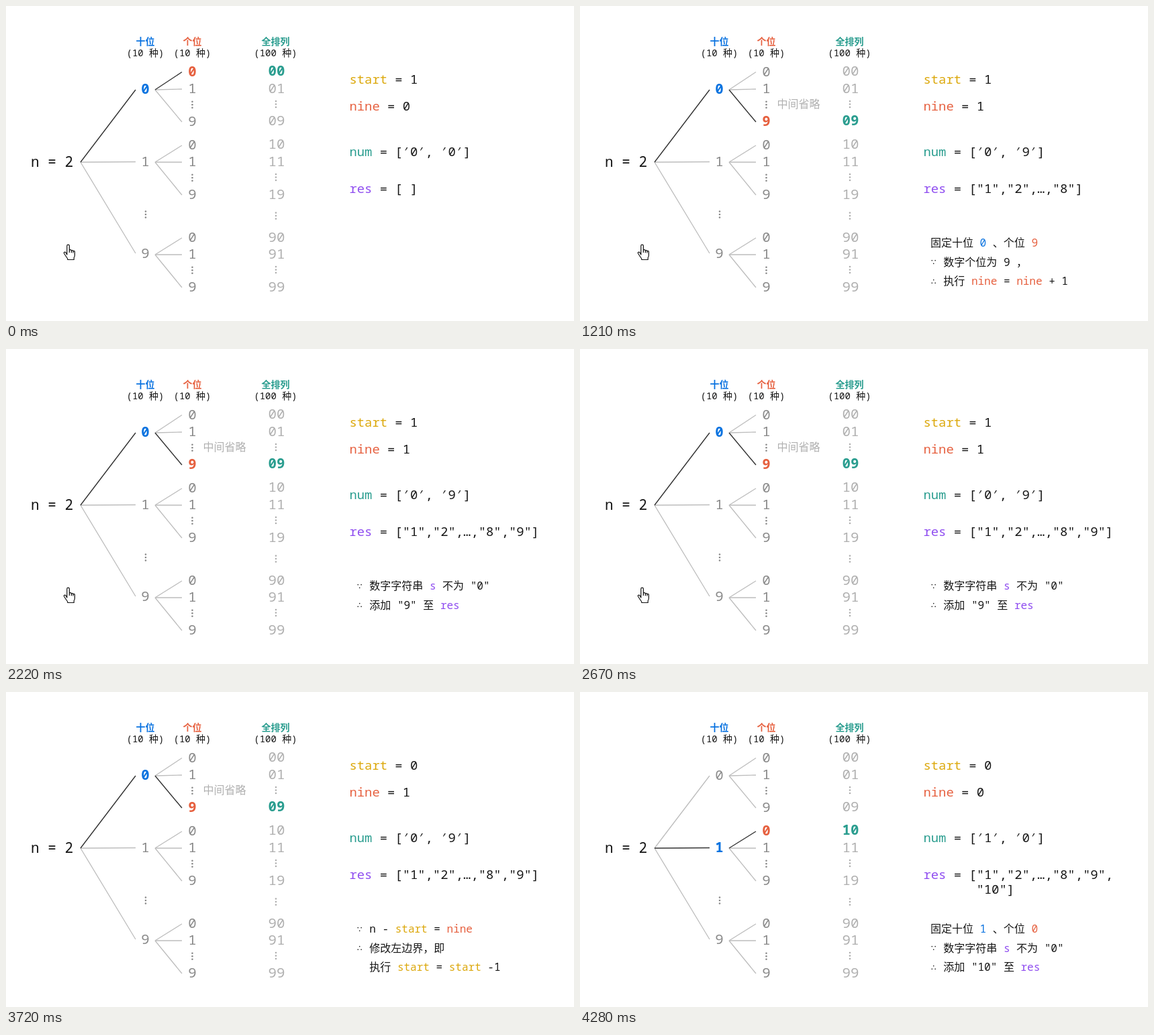
An HTML page for the animation above (5010 ms loop, 846 by 470 pixels).

```html
<!DOCTYPE html>
<html lang="zh-CN">
<head>
<meta charset="utf-8">
<title>递归全排列</title>
<style>
  html, body { margin: 0; width: 100%; height: 100%; overflow: hidden; background: #fff; }
  svg { display: block; width: 846px; height: 470px; }
  text {
    font-family: 'Noto Sans Mono', 'DejaVu Sans Mono', 'Noto Sans CJK SC', 'Noto Sans CJK JP', monospace;
    font-variant-ligatures: none; white-space: pre; fill: #161616;
  }
  .mid { text-anchor: middle; }
  .bold { font-weight: 700; }
  .b { fill: #0b73e0; }
  .o { fill: #e6603f; }
  .t { fill: #2a9d8f; }
  .y { fill: #dca80c; }
  .p { fill: #8f4df0; }
  .g { fill: #8a8a8a; }
  .l { fill: #b0b0b0; }
  path.line { fill: none; stroke: #bdbdbd; stroke-width: 1.3; }
  path.on { stroke: #333; stroke-width: 1.4; }
</style>
</head>
<body>
<svg id="stage" viewBox="0 0 846 470"></svg>
<script>
const LOOP = 5010, CURSOR_END = 3720;
const DIGITS = [0, 1, 9];
const TENS_Y = [124, 232, 369];
const ROOT_ENDS = [125, 232.5, 369];
const FORKS = [125, 233, 371];
const UNIT_Y = [[97.5, 123, 172], [207, 232, 281], [345, 370, 419]];
const PAIR_Y = [[97, 122.5, 171], [206, 232, 281], [345, 370, 419]];
const LIST = '["1","2",…,"8"';

// tens / unit: index of the lit branch
const STEPS = [
  { at: 0, tens: 0, unit: 0, start: 1, nine: 0, num: '00', res: ['[ ]'], note: [] },
  { at: 160, tens: 0, unit: 1, start: 1, nine: 0, num: '01', res: ['["1"]'], note: [
    '开启递归，固定十位 {b 0} 、个位 {o 1}',
    '∵ 数字字符串 {p s} 不为 "0"',
    '∴ 添加 "1" 至 {p res}'] },
  { at: 1210, tens: 0, unit: 2, start: 1, nine: 1, num: '09', res: [LIST + ']'], skip: true, note: [
    '固定十位 {b 0} 、个位 {o 9}',
    '∵ 数字个位为 9 ，',
    '∴ 执行 {o nine} = {o nine} + 1'] },
  { at: 2220, tens: 0, unit: 2, start: 1, nine: 1, num: '09', res: [LIST + ',"9"]'], skip: true, note: [
    '∵ 数字字符串 {p s} 不为 "0"',
    '∴ 添加 "9" 至 {p res}'] },
  { at: 3190, tens: 0, unit: 2, start: 0, nine: 1, num: '09', res: [LIST + ',"9"]'], skip: true, note: [
    '∵ n - {y start} = {o nine}',
    '∴ 修改左边界，即',
    '  执行 {y start} = {y start} -1'] },
  { at: 4200, tens: 1, unit: 0, start: 0, nine: 0, num: '10', res: [LIST + ',"9",', '"10"]'], note: [
    '固定十位 {b 1} 、个位 {o 0}',
    '∵ 数字字符串 {p s} 不为 "0"',
    '∴ 添加 "10" 至 {p res}'] }
];

const rich = s => s.replace(/\{(\w) ([^}]*)\}/g, '<tspan class="$1">$2</tspan>');
const text = (x, y, size, s, cls = '') =>
  `<text x="${x}" y="${y}" font-size="${size}" class="${cls}">${rich(s)}</text>`;
const mid = (x, y, size, s, cls) => text(x, y + size * 0.355, size, String(s), 'mid ' + cls);
const line = (x1, y1, x2, y2, on) =>
  `<path class="line${on ? ' on' : ''}" d="M${x1} ${y1}L${x2} ${y2}"/>`;
const dots = (x, y, cls) => [-4.5, 0, 4.5].map(d =>
  `<circle class="${cls}" cx="${x}" cy="${y + d}" r="1.3"/>`).join('');

function header() {
  return mid(207.5, 53.5, 14, '十位', 'bold b') + mid(207.5, 70, 14, '(10 种)', '') +
    mid(277.5, 53.5, 14, '个位', 'bold o') + mid(277.5, 70, 14, '(10 种)', '') +
    mid(401.5, 53.5, 14, '全排列', 'bold t') + mid(401.5, 70, 14, '(100 种)', '');
}

function tree(s) {
  let dim = '', lit = '', out = text(37, 239.5, 21, 'n = 2');
  const branch = (on, ...p) => { if (on) lit += line(...p, true); else dim += line(...p); };
  DIGITS.forEach((ten, i) => {
    const onTen = i === s.tens;
    branch(onTen, 111, 233, 193, ROOT_ENDS[i]);
    out += mid(207.5, TENS_Y[i], 20.8, ten, onTen ? 'bold b' : 'g');
    DIGITS.forEach((unit, j) => {
      const on = onTen && j === s.unit;
      branch(on, 222, FORKS[i], 262, UNIT_Y[i][j] + 1);
      out += mid(277.5, UNIT_Y[i][j], 20.8, unit, on ? 'bold o' : 'g');
      out += mid(403, PAIR_Y[i][j], 20.8, `${ten}${unit}`, on ? 'bold t' : 'l');
    });
    const y = UNIT_Y[i][1] + 24.2;
    out += dots(277.5, y, 'g') + dots(402, y - 0.7, 'l');
  });
  out += dots(208, 311, 'g') + dots(402, 313, 'l');
  if (s.skip) out += text(293.5, 152, 16, '中间省略', 'l');
  return dim + lit + out;
}

function values(s) {
  const row = (y, str, x = 511.5) => text(x, y, 18.85, str);
  const [a, b] = s.num;
  return row(115.6, `{y start} = ${s.start}`) +
    row(156, `{o nine} = ${s.nine}`) +
    row(223.6, `{t num} = [′${a}′, ′${b}′]`) +
    row(279, `{p res} = ${s.res[0]}`) +
    (s.res[1] ? row(300.5, s.res[1], 590.5) : '');
}

function note(s) {
  return s.note.map((str, i) => {
    const y = 359 + i * 28.7;
    if (!/^[∵∴ ]/.test(str)) return text(522, y, 16, str);
    return text(522.5, y - 0.5, 14, str[0]) + text(541.3, y, 16, str.slice(2));
  }).join('');
}

const hand = `<path id="hand" fill="#fff" stroke="#111" stroke-width="1.2" stroke-linejoin="round"
  d="M90.8 371V358a1.8 1.8 0 0 1 3.6 0V364.5a1.6 1.6 0 0 1 3 .6a1.5 1.5 0 0 1 2.6 .8
  a1.4 1.4 0 0 1 2.4 1.2V371.5q0 2.5-1.2 4V378.5H91.8V377q-1.6-2-3-4.2L86.6 369.2
  q-.8-1.5 .5-2q1-.4 2.2 1ZM94.4 364.5V368M97.4 365.1V368.3M100 365.9V368.6"/>`;

const stage = document.getElementById('stage');
stage.innerHTML = header() + '<g id="scene"></g>' + hand;
const scene = document.getElementById('scene');
const cursor = document.getElementById('hand');
let shown = null;

function frame() {
  const t = performance.now() % LOOP;
  const step = STEPS.filter(s => s.at <= t).pop();
  if (step !== shown) {
    scene.innerHTML = tree(step) + values(step) + note(step);
    shown = step;
  }
  cursor.style.display = t < CURSOR_END ? '' : 'none';
  requestAnimationFrame(frame);
}
frame();
</script>
</body>
</html>
```
